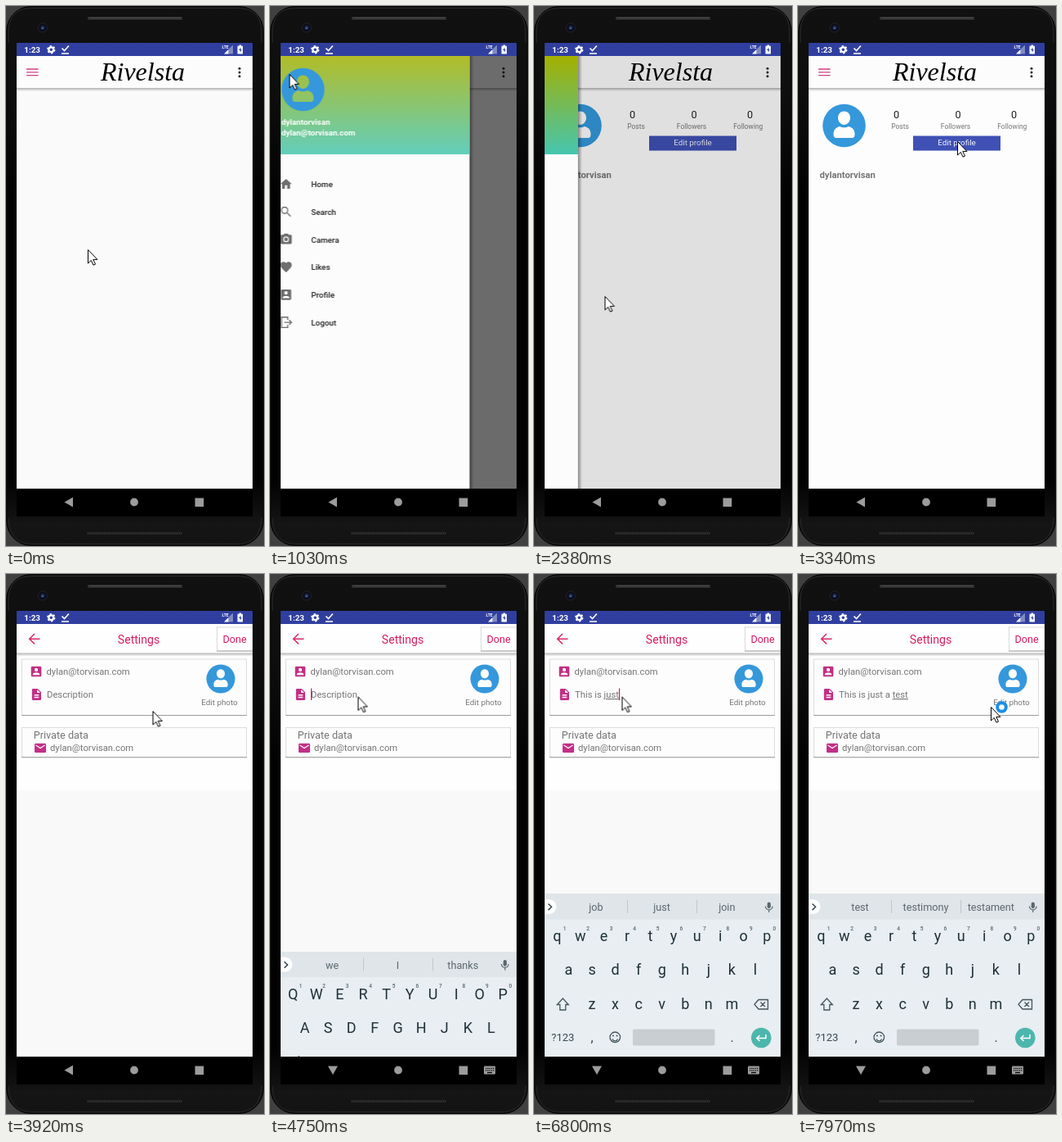
An HTML page for the animation above (8000 ms loop, 316 px wide and 659 px high).

```html
<!DOCTYPE html>
<html lang="en">
<head>
<meta charset="utf-8">
<title>Photo app demo</title>
<style>
html, body { margin: 0; width: 100%; height: 100%; overflow: hidden; background: #222; }
svg { display: block; --settle: cubic-bezier(.23, 1, .32, 1); }
text { font-family: Roboto, "Open Sans", sans-serif; white-space: pre; }
.mid { text-anchor: middle; }
.t12 { font-size: 8.44px; }
.t14 { font-size: 9.84px; }
.t16 { font-size: 11.25px; }
.t18 { font-size: 12.65px; }
.t20 { font-size: 14.06px; }
.bold { font-weight: 700; }
.med { font-weight: 500; }
.grey { fill: #757575; }
.pink { fill: #d81b60; }
.logo { font: italic 32px "Liberation Serif", "Noto Serif", serif; }

.drawer, .scrim, .header, .profile, .settings, .keys, .nav-a, .nav-b, .mouse, .busy {
  animation: 8s linear infinite;
}
.drawer { animation-name: drawer; animation-timing-function: var(--settle); }
.scrim { animation-name: scrim; animation-timing-function: var(--settle); }
.header { animation-name: header; }
.profile { animation-name: profile; animation-timing-function: step-end; }
.settings { animation-name: settings; animation-timing-function: ease-out; }
.keys { animation-name: keys; animation-timing-function: ease-out; }
.nav-a { animation-name: navA; animation-timing-function: step-end; }
.nav-b { animation-name: navB; animation-timing-function: step-end; }
.mouse { animation-name: mouse; animation-timing-function: ease-in-out; }
.busy { animation-name: busy; animation-timing-function: step-end; }

@keyframes drawer {
  0%, 10% { transform: translateX(-250px); }
  16.4%, 28% { transform: translateX(0); }
  34.4%, 100% { transform: translateX(-250px); }
}
@keyframes scrim {
  0%, 10% { opacity: 0; }
  16.4%, 28% { opacity: .6; }
  34.4%, 100% { opacity: 0; }
}
@keyframes header {
  0%, 10% { opacity: .7; }
  13% { opacity: .85; }
  17.5%, 100% { opacity: 1; }
}
@keyframes profile { 0% { opacity: 0; } 28.6%, 100% { opacity: 1; } }
@keyframes settings {
  0%, 45% { opacity: 0; transform: translateY(44px); }
  48.5%, 100% { opacity: 1; transform: translateY(0); }
}
@keyframes keys {
  0%, 57.5% { transform: translateY(204px); }
  61.5%, 100% { transform: translateY(0); }
}
@keyframes navA { 0% { opacity: 1; } 55%, 100% { opacity: 0; } }
@keyframes navB { 0% { opacity: 0; } 55%, 100% { opacity: 1; } }
@keyframes busy { 0% { opacity: 0; } 99.2%, 100% { opacity: 1; } }
@keyframes mouse {
  0%, .75% { transform: translate(100px, 297px); }
  7% { transform: translate(8px, 59px); }
  9.5%, 17.5% { transform: translate(23.5px, 83px); }
  26%, 30% { transform: translate(86.5px, 354px); }
  37% { transform: translate(240px, 185px); }
  40.75% { transform: translate(184px, 156px); }
  41.75%, 44% { transform: translate(195px, 165px); }
  49%, 49.5% { transform: translate(179.5px, 167px); }
  53%, 92% { transform: translate(107.5px, 149.5px); }
  98.6% { transform: translate(228px, 155px); }
  99.5%, 100% { transform: translate(236px, 162px); }
}
</style>
</head>
<body>
<svg width="316" height="659" viewBox="0 0 316 659">
  <defs>
    <linearGradient id="side" x1="0" y1="0" x2="0" y2="1">
      <stop offset="0" stop-color="#111"/><stop offset=".16" stop-color="#0e0e0e"/>
      <stop offset=".35" stop-color="#020202"/><stop offset=".88" stop-color="#020202"/>
      <stop offset=".96" stop-color="#151515"/><stop offset="1" stop-color="#131313"/>
    </linearGradient>
    <linearGradient id="head" x1="0" y1="0" x2="0" y2="1">
      <stop offset="0" stop-color="#a4b000"/><stop offset="1" stop-color="#45c6b0"/>
    </linearGradient>
    <linearGradient id="fade" x1="0" y1="0" x2="0" y2="1">
      <stop offset="0" stop-opacity=".3"/><stop offset="1" stop-opacity="0"/>
    </linearGradient>
    <linearGradient id="edge">
      <stop offset="0" stop-opacity=".4"/><stop offset="1" stop-opacity="0"/>
    </linearGradient>
    <clipPath id="view"><rect x="13" y="61" width="289" height="528"/></clipPath>

    <symbol id="home" viewBox="0 0 24 24"><path d="M10 20v-6h4v6h5v-8h3L12 3 2 12h3v8z"/></symbol>
    <symbol id="search" viewBox="0 0 24 24"><g fill="none" stroke="#6e6e6e" stroke-width="2"><circle cx="9.5" cy="9.5" r="5.5"/><path d="M14 14l6 6"/></g></symbol>
    <symbol id="camera" viewBox="0 0 24 24"><path d="M9 2L7.2 4H4a2 2 0 0 0-2 2v12a2 2 0 0 0 2 2h16a2 2 0 0 0 2-2V6a2 2 0 0 0-2-2h-3.2L15 2zm3 15a5 5 0 1 1 0-10 5 5 0 0 1 0 10z"/><circle cx="12" cy="12" r="3.2"/></symbol>
    <symbol id="heart" viewBox="0 0 24 24"><path d="M12 21.3l-1.5-1.3C5.4 15.4 2 12.3 2 8.5 2 5.4 4.4 3 7.5 3c1.7 0 3.4.8 4.5 2.1C13.1 3.8 14.8 3 16.5 3 19.6 3 22 5.4 22 8.5c0 3.8-3.4 6.9-8.5 11.5z"/></symbol>
    <symbol id="person" viewBox="0 0 24 24"><path fill-rule="evenodd" d="M5 3h14a2 2 0 0 1 2 2v14a2 2 0 0 1-2 2H5a2 2 0 0 1-2-2V5a2 2 0 0 1 2-2zm7 3a3 3 0 1 0 0 6 3 3 0 0 0 0-6zM6 18h12v-1c0-2-4-3.1-6-3.1S6 15 6 17z"/></symbol>
    <symbol id="logout" viewBox="0 0 24 24"><path fill="none" stroke="#6e6e6e" stroke-width="2" d="M15 8V3H4v18h11v-5M9 12h12M17.5 8l4 4-4 4"/></symbol>
    <symbol id="doc" viewBox="0 0 24 24"><path fill-rule="evenodd" d="M14 2H6a2 2 0 0 0-2 2v16a2 2 0 0 0 2 2h12a2 2 0 0 0 2-2V8zm2 16H8v-2h8zm0-4H8v-2h8zm-3-5V3.5L18.5 9z"/></symbol>
    <symbol id="mail" viewBox="0 0 24 24"><path d="M20 4H4a2 2 0 0 0-2 2v12a2 2 0 0 0 2 2h16a2 2 0 0 0 2-2V6a2 2 0 0 0-2-2zm0 4l-8 5-8-5V6l8 5 8-5z"/></symbol>
    <symbol id="avatar" viewBox="-27 -27 54 54"><path fill="#3498db" fill-rule="evenodd" d="M0-26.3a26.3 26.3 0 1 1 0 52.6 26.3 26.3 0 1 1 0-52.6zM0-17.5c-4.5 0-7.5 3.5-7.5 8S-4-1 0-1s7.5-4 7.5-8.5-3-8-7.5-8zM-5.5 1C-10 2-13 5-13 10c0 4 1 5 4 5H9c3 0 4-1 4-5 0-5-3-8-7.5-9-3 1.8-8 1.8-11 0z"/></symbol>
  </defs>

  <!-- phone body -->
  <rect width="316" height="659" fill="#404040"/>
  <rect x=".8" y=".5" width="314.4" height="658" rx="31" fill="url(#side)" stroke="#0a0a0a" stroke-width="1.5"/>
  <path d="M3 45V32Q3 3 32 2.5H284Q313 3 313 32V45" fill="none" stroke="#2c2c2c"/>
  <path d="M3 625Q4 656 32 656.5H284Q312 656 313 625" fill="none" stroke="#2a2a2a"/>
  <rect x="99" y="12.5" width="118" height="5" rx="2.5" fill="#303030" stroke="#0c0c0c"/>
  <path d="M102 14.5H214" stroke="#474747"/>
  <path d="M100 643.5H215" stroke="#393939" stroke-width="3" stroke-dasharray="1 1"/>
  <circle cx="45" cy="26.5" r="5.5" fill="#0b0d16" stroke="#23252e"/>
  <circle cx="45" cy="26.5" r="2.5" fill="#202d5c"/><circle cx="44.5" cy="27" r=".9" fill="#596fc0"/>

  <!-- status bar -->
  <rect x="13" y="45" width="289" height="16.5" fill="#303f9f"/>
  <g fill="#fff">
    <text x="22.3" y="56.7" class="t14 bold">1:23</text>
    <g fill="none" stroke="#fff">
      <circle cx="55.3" cy="53.2" r="2.9" stroke-width="2.2"/>
      <circle cx="55.3" cy="53.2" r="4.3" stroke-width="1.8" stroke-dasharray="2.25 2.25"/>
      <path d="M68.5 51.5l3 3 5.5-6M68 58h9" stroke-width="1.6"/>
    </g>
    <text x="264.5" y="51.5" font-size="5" class="bold">LTE</text>
    <path d="M267 58.5l5.5-5.5v5.5z"/><path d="M272.5 53l5.5-5.5v11h-5.5z" opacity=".4"/>
    <path d="M285.5 47.5h2.5v1.2h2v9.8h-6.5v-9.8h2z"/>
    <path d="M287.5 50.5l-2.3 3.5h1.5v2.8l2.1-3.6h-1.3z" fill="#303f9f"/>
  </g>

  <g clip-path="url(#view)">
    <rect x="13" y="61" width="289" height="528" fill="#fafafa"/>

    <g class="profile">
      <rect x="13" y="101" width="289" height="488" fill="#fdfdfd"/>
      <use href="#avatar" x="29.5" y="119" width="54" height="54"/>
      <g class="mid t18" fill="#212121"><text x="120.5" y="137">0</text><text x="196" y="137">0</text><text x="264.5" y="137">0</text></g>
      <g class="mid t12 grey"><text x="125" y="149.5">Posts</text><text x="193" y="149.5">Followers</text><text x="262.3" y="149.5">Following</text></g>
      <rect x="141" y="158.5" width="107" height="18" fill="#3f51b5"/>
      <text x="194.5" y="170" class="mid t14" fill="#f4f5fb">Edit profile</text>
      <text x="26.5" y="210" class="t16 bold grey">dylantorvisan</text>
    </g>

    <rect x="13" y="61" width="289" height="39.5" fill="#fcfcfc"/>
    <rect x="13" y="100" width="289" height="4" fill="url(#fade)"/>
    <path d="M25 77H39.5M25 80.8H39.5M25 84.6H39.5" stroke="#cf3f86" stroke-width="1.3"/>
    <text x="167.5" y="91" class="logo mid">Rivelsta</text>
    <g fill="#222"><circle cx="286" cy="76.3" r="1.5"/><circle cx="286" cy="81" r="1.5"/><circle cx="286" cy="85.7" r="1.5"/></g>

    <rect class="scrim" x="13" y="61" width="289" height="528"/>
    <g class="drawer">
      <rect x="257" y="61" width="5" height="528" fill="url(#edge)"/>
      <rect x="13" y="61" width="244" height="528" fill="#fcfcfc"/>
      <rect class="header" x="13" y="61" width="244" height="120" fill="url(#head)"/>
      <use href="#avatar" x="26" y="75" width="54" height="54"/>
      <g class="t14 bold" fill="#fff"><text x="26.5" y="144.8">dylantorvisan</text><text x="26.5" y="157.5">dylan@torvisan.com</text></g>
      <g id="menu" fill="#6e6e6e"></g>
    </g>

    <g class="settings">
      <rect x="13" y="61" width="289" height="528" fill="#f9f9f9"/>
      <rect x="13" y="61" width="289" height="203" fill="#fefefe"/>
      <rect x="13" y="96.5" width="289" height="4" fill="url(#fade)"/>
      <path d="M41.5 79.2H29M35 73l-6.3 6.2 6.3 6.2" fill="none" stroke="#d12a6d" stroke-width="1.5"/>
      <text x="162.5" y="84.5" class="mid t20 pink">Settings</text>
      <rect x="258.5" y="65" width="45" height="29" fill="#fff" stroke="#dadada"/>
      <path d="M258 94H302" stroke="#a5a5a5"/>
      <text x="280" y="84" class="mid t18 pink">Done</text>
      <g fill="#fdfdfd" stroke="#dcdcdc"><rect x="19.5" y="104" width="275" height="68.5"/><rect x="19.5" y="187.5" width="275" height="36"/></g>
      <path d="M19 172.5H295M19 223.7H295" stroke="#9c9c9c"/>
      <g fill="#c22f86">
        <use href="#person" x="28.6" y="110.6" width="16.87" height="16.87"/>
        <use href="#doc" x="29" y="138.6" width="16.87" height="16.87"/>
        <use href="#mail" x="33.6" y="204" width="16.87" height="16.87"/>
      </g>
      <g class="t16 grey">
        <text x="49.5" y="122.8">dylan@torvisan.com</text>
        <text x="50" y="151" id="field"><tspan id="done"></tspan><tspan id="word" text-decoration="underline"></tspan></text>
        <text x="50" y="151" id="hint">Description</text>
        <text x="54" y="216.3">dylan@torvisan.com</text>
      </g>
      <rect id="caret" y="139.5" width="1.2" height="14.5" fill="#d81b60"/>
      <text x="33.7" y="201" class="t18 grey">Private data</text>
      <use href="#avatar" x="245" y="110" width="36" height="36"/>
      <text x="261.5" y="160" class="mid t14 grey">Edit photo</text>
    </g>

    <g class="keys">
      <rect x="13" y="390" width="289" height="199" fill="#e8eef1"/>
      <rect x="13" y="390" width="289" height="31.5" fill="#dfe5e8"/>
      <path d="M13 397h5.5a9 9 0 0 1 0 18H13z" fill="#fff"/>
      <path d="M17.5 402.5l4 3.8-4 3.8" fill="none" stroke="#37474f" stroke-width="1.5"/>
      <path d="M114.5 398V414M199.5 398V414" stroke="#c0c8cc"/>
      <g id="tips" class="mid t18" fill="#5b676d"><text x="76" y="411"/><text x="156.5" y="411"/><text x="236.3" y="411"/></g>
      <g fill="none" stroke="#5b676d" stroke-width="1.2"><rect x="286.3" y="401" width="3" height="6.5" rx="1.5" fill="#5b676d"/><path d="M283.5 405.5a4.3 4.3 0 0 0 8.6 0M287.8 410v3"/></g>
      <g id="letters" class="mid" font-size="18" fill="#1f3037"></g>
      <g id="digits" class="mid med" font-size="6.5" fill="#5b676d"></g>
      <g fill="none" stroke="#44545b" stroke-width="1.3">
        <path id="shift" d="M35.3 518l7 7.5h-3.5v6.5h-7v-6.5h-3.5z"/>
        <path d="M275 519.5h11.5v11.5H275l-5-5.75zM277.5 522.5l5.5 5.5M283 522.5l-5.5 5.5"/>
        <circle cx="99.3" cy="565.3" r="6.3"/><path d="M96 567.5a3.5 3.5 0 0 0 6.6 0"/>
      </g>
      <circle cx="97" cy="563.5" r="1" fill="#44545b"/><circle cx="101.6" cy="563.5" r="1" fill="#44545b"/>
      <g class="mid" fill="#37474f"><text x="35.3" y="570" font-size="13">?123</text><text x="71" y="570.5" font-size="16">,</text><text x="242.5" y="570.5" font-size="16">.</text></g>
      <rect x="121" y="555.5" width="100.5" height="20" rx="2" fill="#c8ced1"/>
      <circle cx="278.3" cy="566" r="12.3" fill="#4db6ac"/>
      <path d="M284 562v4.5H273M276.5 563l-3.7 3.5 3.7 3.5" fill="none" stroke="#fff" stroke-width="1.5"/>
    </g>
  </g>

  <!-- navigation bar -->
  <rect x="13" y="589" width="289" height="34" fill="#000"/>
  <g fill="#9c9c9c">
    <path class="nav-a" d="M71.5 605.5l10.5-6v12z"/>
    <circle cx="157" cy="605.5" r="4.9"/>
    <rect x="231.5" y="600.5" width="10.7" height="10.5"/>
    <g class="nav-b">
      <path d="M71 600.5h12l-6 10.5z"/>
      <rect x="262" y="600.5" width="14" height="10" rx="1"/>
      <path d="M264 603.3H274.5M264 605.8H274.5" stroke="#000" stroke-width="1.2" stroke-dasharray="1.3 1"/><path d="M266 608.5h6" stroke="#000" stroke-width="1.2"/>
    </g>
  </g>

  <g class="mouse">
    <path d="M.5.5v16.5l3.8-3.6 2.7 5.8 2.5-1.1-2.7-5.7h5.1z" fill="#fff" stroke="#000"/>
    <circle class="busy" cx="13.5" cy=".5" r="5.3" fill="#fff" stroke="#1c8fe6" stroke-width="4"/>
  </g>
</svg>
<script>
const $ = id => document.getElementById(id);

function add(parent, tag, attrs, label = "") {
  const el = document.createElementNS("http://www.w3.org/2000/svg", tag);
  for (const k in attrs) el.setAttribute(k, attrs[k]);
  el.textContent = label;
  parent.append(el);
  return el;
}

["home Home", "search Search", "camera Camera", "heart Likes", "person Profile", "logout Logout"].forEach((item, i) => {
  const [icon, label] = item.split(" ");
  const y = 217.3 + i * 33.75;
  add($("menu"), "use", { href: "#" + icon, x: 23.8, y: y - 8.4, width: 16.87, height: 16.87 });
  add($("menu"), "text", { x: 63, y: y + 3.8, class: "t14 med", fill: "#222" }, label);
});

const step = 28.55;
const letters = [];
[["qwertyuiop", 28.3, 448], ["asdfghjkl", 42.5, 489], ["zxcvbnm", 71, 531]].forEach(([row, x, y]) => {
  [...row].forEach((c, i) => letters.push(add($("letters"), "text", { x: x + i * step, y }, c)));
});
[..."1234567890"].forEach((c, i) => add($("digits"), "text", { x: 37.5 + i * step, y: 434.5 }, c));

const message = "This is just a test";
const tips = [
  [0, "we I thanks"], [2, "The This That"], [5, "is was one"], [6, "in is it"],
  [8, "a the not"], [9, "job just join"], [13, "a the like"], [14, "an a and"],
  [15, "few little good"], [16, "the to that"], [17, "tell test team"],
  [18, "test tests testing"], [19, "test testimony testament"]
];
const keyTime = n => n === 1 ? 5520 : 5740 + (n - 2) * 97;
let shown = -1;

function showText(n) {
  const text = message.slice(0, n);
  const cut = text.lastIndexOf(" ") + 1;
  $("done").textContent = text.slice(0, cut);
  $("word").textContent = text.slice(cut);
  $("hint").style.opacity = n ? 0 : 1;
  $("caret").setAttribute("x", 50 + (n ? $("field").getComputedTextLength() : 0));
  const words = tips.filter(([min]) => n >= min).pop()[1].split(" ");
  [...$("tips").children].forEach((el, i) => { el.textContent = words[i]; });
  letters.forEach(el => {
    el.textContent = n ? el.textContent.toLowerCase() : el.textContent.toUpperCase();
  });
  $("shift").setAttribute("fill", n ? "none" : "#44545b");
  shown = n;
}

function draw() {
  const t = performance.now() % 8000;
  let n = 0;
  while (n < message.length && t >= keyTime(n + 1)) n++;
  if (n !== shown) showText(n);
  const since = t - (n ? keyTime(n) : 4310);
  $("caret").style.opacity = since >= 0 && since % 1000 < 500 ? 1 : 0;
  requestAnimationFrame(draw);
}
draw();
</script>
</body>
</html>
```
